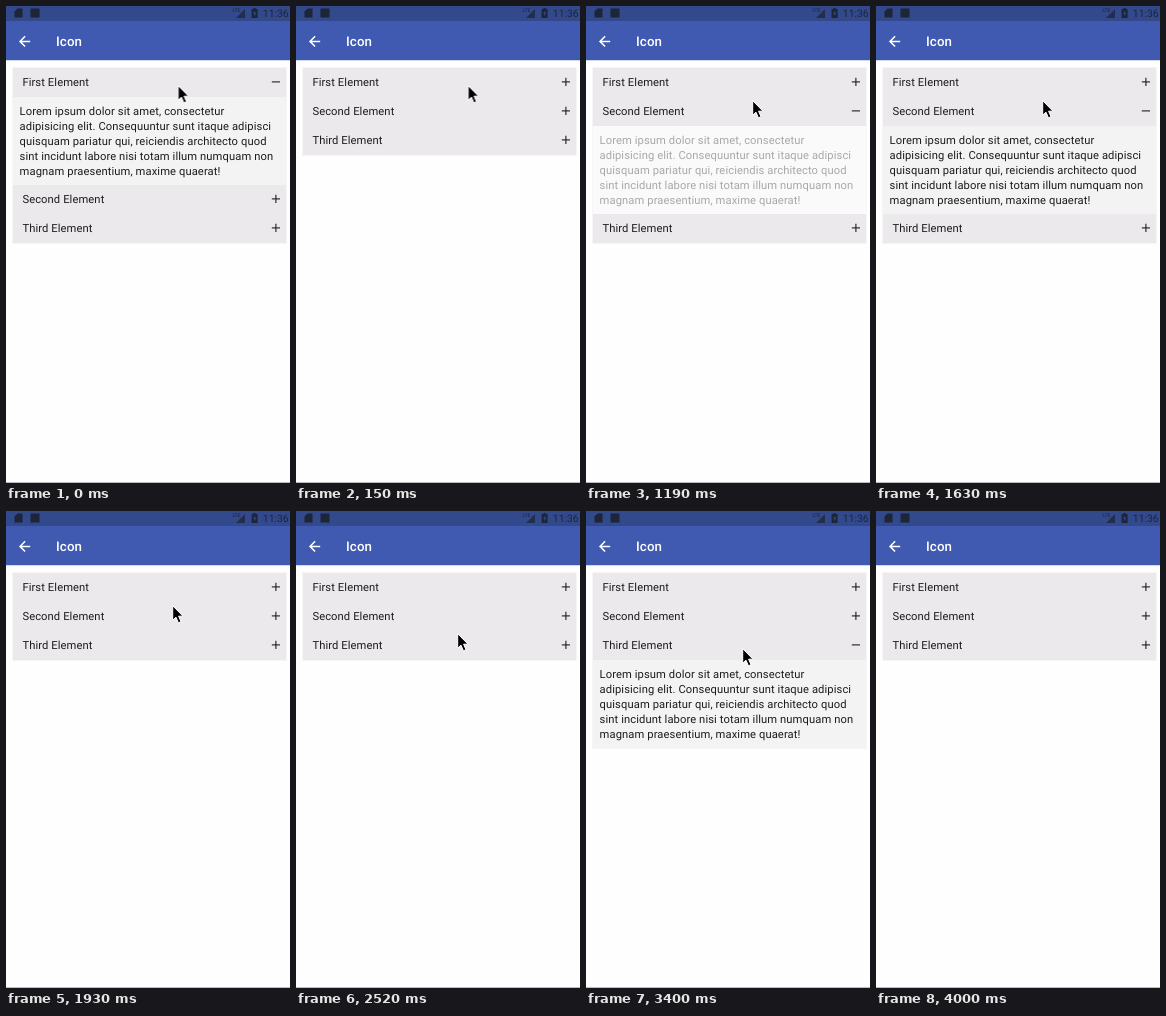
Animation, 284 px wide and 477 px high, one loop 5.19 s. Source, as an HTML page:

```html
<!DOCTYPE html>
<html lang="en">
<head>
<meta charset="utf-8">
<title>Accordion</title>
<style>
  html, body { margin: 0; width: 100%; height: 100%; overflow: hidden; background: #fefefe; }
  body {
    position: relative;
    font: 11.2px/14.85px Roboto, sans-serif;
    letter-spacing: .095px;
    color: #1c1c1e;
    text-rendering: geometricPrecision;
  }
  .stage { position: absolute; inset: 0; width: 284px; height: 477px; overflow: hidden; }
  .bar, .cursor { position: absolute; left: 0; top: 0; }
  .list { position: absolute; left: 7px; top: 62px; width: 273px; box-shadow: 0 0 0 1px #f7f6f7; }
  .head { position: relative; height: 29.1px; background: #ebe9eb; }
  .head span { position: absolute; left: 9.4px; top: 8.1px; }
  .head svg { position: absolute; left: 257.7px; top: 9px; }
  .head path { stroke: #1c1c1e; stroke-width: 1.1; }
  .panel { height: 0; overflow: hidden; white-space: pre; background: #f3f3f3; }
  .panel p { margin: 0; padding: 8.1px 6.6px 0; }
  .foot { position: absolute; left: 0; top: 476px; width: 284px; height: 1px; background: #bdbdbd; }

  .panel, .stem, .cursor { animation: 5190ms step-end infinite; }
  .one .panel { animation-name: open1; }
  .two .panel { animation-name: open2; }
  .three .panel { animation-name: open3; }
  .one .stem { animation-name: stem1; }
  .two .stem { animation-name: stem2; }
  .three .stem { animation-name: stem3; }
  .cursor { animation-name: point; }

  /* Panels open at once and fade in by steps; they close hard. */
  @keyframes open1 {
    0% { height: 88px; }
    2.89%, 100% { height: 0; }
  }
  @keyframes open2 {
    0% { height: 0; opacity: .38; }
    22.928% { height: 88px; opacity: .38; }
    25.818% { height: 88px; opacity: .66; }
    28.516% { height: 88px; opacity: .9; }
    31.406% { height: 88px; opacity: 1; }
    37.186%, 100% { height: 0; opacity: 1; }
  }
  @keyframes open3 {
    0% { height: 0; opacity: .33; }
    57.032% { height: 88px; opacity: .33; }
    59.73% { height: 88px; opacity: .6; }
    62.62% { height: 88px; opacity: .85; }
    65.51% { height: 88px; opacity: 1; }
    71.29%, 100% { height: 0; opacity: 1; }
  }
  @keyframes stem1 {
    0% { opacity: 0; }
    2.89%, 100% { opacity: 1; }
  }
  @keyframes stem2 {
    0% { opacity: 1; }
    22.928% { opacity: 0; }
    37.186%, 100% { opacity: 1; }
  }
  @keyframes stem3 {
    0% { opacity: 1; }
    57.032% { opacity: 0; }
    71.29%, 100% { opacity: 1; }
  }
  @keyframes point {
    0% { transform: translate(170.5px, 79px); opacity: 1; }
    11.368% { transform: translate(168px, 89px); opacity: 1; }
    14.258% { transform: translate(165px, 94px); opacity: 1; }
    45.664% { transform: translate(163px, 112px); opacity: 1; }
    48.554% { transform: translate(160px, 122px); opacity: 1; }
    51.252% { transform: translate(155px, 137px); opacity: 1; }
    77.071%, 100% { transform: translate(155px, 137px); opacity: 0; }
  }
</style>
</head>
<body>
<div class="stage">
  <svg class="bar" width="284" height="56" font-family="Roboto, sans-serif" letter-spacing="0">
    <rect y="54" width="284" height="1" fill="#d4d6e0"/>
    <rect width="284" height="54" fill="#3f5ab0"/>
    <rect width="284" height="15" fill="#32498c"/>
    <g fill="#1d2536">
      <path d="M11.5 2.5H16.5V11.5H8.5V5.5Z"/>
      <rect x="24.5" y="2.5" width="9" height="9"/>
      <path d="M239 3V12H230Z" opacity=".75"/>
      <text x="226.5" y="6.3" font-size="5">LTE</text>
      <path d="M247.4 2.9V2H249.8V2.9H251.6V12H245.6V2.9Z"/>
      <text x="256.8" y="11.2" font-size="10.4">11:36</text>
    </g>
    <path d="M249.2 4.4L247.2 7.8H248.4V10.4L250.2 6.9H249.2Z" fill="#32498c"/>
    <path d="M24.2 35.4H14.5M19.1 30.3L14 35.4L19.1 40.5" fill="none" stroke="#fff" stroke-width="1.5"/>
    <text x="50" y="40.3" font-size="13.3" font-weight="500" letter-spacing=".1" fill="#fff">Icon</text>
  </svg>

  <div class="list"></div>
  <div class="foot"></div>

  <svg class="cursor" width="14" height="20">
    <path d="M1.7 .7V15.2L5 12.2L7.4 17.8L10 16.7L7.6 11.2H12Z" fill="#000" stroke="#fff"/>
  </svg>
</div>

<script>
  const copy = `Lorem ipsum dolor sit amet, consectetur
adipisicing elit. Consequuntur sunt itaque adipisci
quisquam pariatur qui, reiciendis architecto quod
sint incidunt labore nisi totam illum numquam non
magnam praesentium, maxime quaerat!`;

  const section = name => `
    <section class="${name.toLowerCase()}">
      <div class="head">
        <span>${name === "One" ? "First" : name === "Two" ? "Second" : "Third"} Element</span>
        <svg width="10" height="10"><path d="M.8 4.9H9"/><path class="stem" d="M4.9 .8V9"/></svg>
      </div>
      <div class="panel"><p>${copy}</p></div>
    </section>`;

  document.querySelector(".list").innerHTML = ["One", "Two", "Three"].map(section).join("");
</script>
</body>
</html>
```
